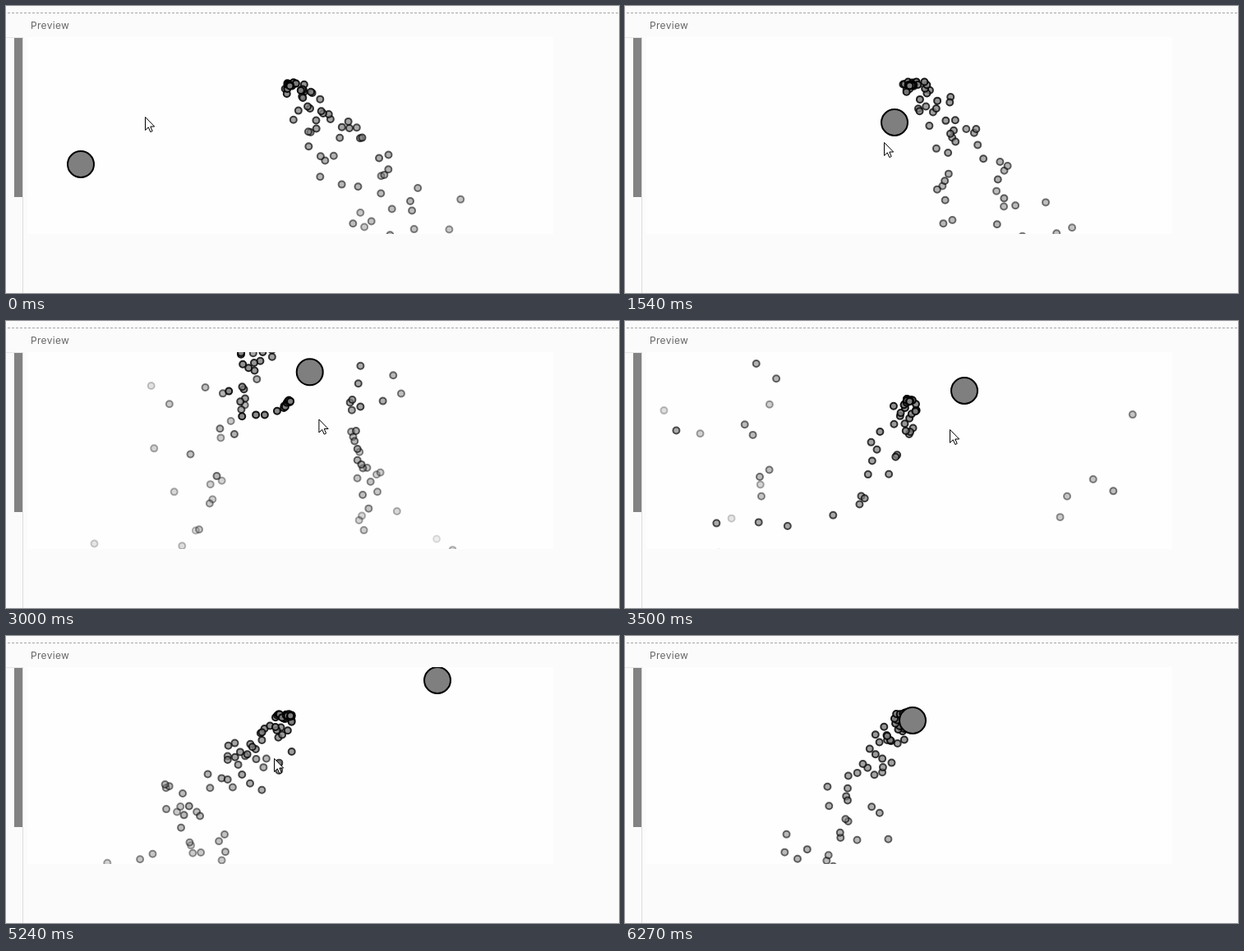
Recreate the animation shown at these times as an HTML page with a canvas. Size 746 by 350 pixels, loop 6300 ms.

```html
<!DOCTYPE html>
<html lang="en">
<head>
<meta charset="utf-8">
<title>Preview</title>
<style>
  html, body { margin: 0; width: 100%; height: 100%; overflow: hidden; background: #fbfbfb; }
  canvas { position: absolute; left: 0; top: 0; }
  h1 {
    position: absolute; left: 30px; top: 16px; margin: 0;
    font: 400 12px/16px Inter, sans-serif; letter-spacing: .3px; color: #666;
  }
</style>
</head>
<body>
<canvas id="stage" width="746" height="350"></canvas>
<h1>Preview</h1>
<script>
const ctx = document.getElementById('stage').getContext('2d');
const LOOP = 6300, FRAMES = 189, WARMUP = 140;
const VIEW = [26, 38, 640, 240];
const SOURCE = { x: 346, y: 98 };
const GRAVITY = 0.1, POWER = 150;

// Key points: time in ms, x, y
const BALL = [
  [0, 91, 193], [400, 84, 152], [1000, 205, 101], [1540, 328, 142], [1980, 366, 196],
  [2440, 343, 170], [2800, 353, 98], [3150, 384, 48], [3500, 413, 85], [4240, 410, 194],
  [4800, 440, 118], [5240, 525, 54], [5750, 503, 51], [6270, 350, 103]
];
const POINTER = [
  [0, 169, 135], [1540, 315, 166], [2440, 363, 112], [3500, 395, 132],
  [4240, 428, 127], [5240, 326, 149], [5750, 332, -25]
];

// Smooth curve through timed points
function along(track, t) {
  const last = track.length - 1;
  if (t <= track[0][0]) return track[0].slice(1);
  if (t >= track[last][0]) return track[last].slice(1);
  const i = track.findIndex(p => p[0] > t) - 1;
  const a = track[i], b = track[i + 1], span = b[0] - a[0], u = (t - a[0]) / span;
  const slope = (k, c) => {
    const p = track[Math.max(k - 1, 0)], q = track[Math.min(k + 1, last)];
    return (q[c] - p[c]) / (q[0] - p[0]) * span;
  };
  return [1, 2].map(c => {
    const m = slope(i, c), n = slope(i + 1, c), d = b[c] - a[c];
    return a[c] + u * (m + u * (3 * d - 2 * m - n + u * (m + n - 2 * d)));
  });
}

function seeded(seed) {
  return () => {
    seed = (seed + 0x6d2b79f5) | 0;
    let v = Math.imul(seed ^ (seed >>> 15), 1 | seed);
    v = (v + Math.imul(v ^ (v >>> 7), 61 | v)) ^ v;
    return ((v ^ (v >>> 14)) >>> 0) / 4294967296;
  };
}

// Run the fountain once, two steps per shown picture
function simulate() {
  const rand = seeded(17), shots = [];
  let dots = [];
  for (let s = -WARMUP; s < FRAMES * 2; s++) {
    const [bx, by] = along(BALL, s * 1000 / 60);
    dots.push({ ...SOURCE, vx: rand() * 2 - 1, vy: -rand(), life: 255 });
    for (const p of dots) {
      const dx = p.x - bx, dy = p.y - by, dist = Math.hypot(dx, dy) || 1;
      const near = Math.min(Math.max(dist, 5), 50);
      const push = POWER / (near * near) / dist;
      p.vx += dx * push;
      p.vy += dy * push + GRAVITY;
      p.x += p.vx;
      p.y += p.vy;
      p.life -= 2;
    }
    dots = dots.filter(p => p.life > 0);
    if (s >= 0 && s % 2 === 0) shots.push(dots.map(p => [p.x, p.y, p.life / 255]));
  }
  return shots;
}

function disc(x, y, r, alpha) {
  ctx.fillStyle = `rgba(127,127,127,${alpha})`;
  ctx.strokeStyle = `rgba(0,0,0,${alpha})`;
  ctx.lineWidth = 2;
  ctx.beginPath();
  ctx.arc(x, y, r, 0, Math.PI * 2);
  ctx.fill();
  ctx.stroke();
}

function line(x1, y1, x2, y2, color, dash = []) {
  ctx.strokeStyle = color;
  ctx.lineWidth = 1;
  ctx.setLineDash(dash);
  ctx.beginPath();
  ctx.moveTo(x1, y1);
  ctx.lineTo(x2, y2);
  ctx.stroke();
  ctx.setLineDash([]);
}

function drawPage() {
  ctx.fillStyle = '#fbfbfb';
  ctx.fillRect(0, 0, 746, 350);
  line(2, 8.5, 746, 8.5, '#a6a6a6', [3, 2]);
  line(0, 38.5, 20, 38.5, '#e6e6e6');
  line(20.5, 38, 20.5, 350, '#dcdcdc');
  ctx.fillStyle = '#828282';
  ctx.fillRect(10, 39, 10, 194);
  ctx.fillStyle = '#fefefe';
  ctx.fillRect(...VIEW);
}

const arrow = new Path2D('M.5 .5V16.5L4.3 12.9L6.8 18.6L9.2 17.5L6.8 12H11.7Z');

function drawPointer(x, y) {
  ctx.save();
  ctx.translate(x, y);
  ctx.fillStyle = '#fff';
  ctx.strokeStyle = '#000';
  ctx.lineWidth = 1;
  ctx.fill(arrow);
  ctx.stroke(arrow);
  ctx.restore();
}

const shots = simulate();

function draw(frame) {
  const t = Math.ceil(frame * 10 / 3) * 10;
  drawPage();
  ctx.save();
  ctx.beginPath();
  ctx.rect(...VIEW);
  ctx.clip();
  for (const [x, y, alpha] of shots[frame]) disc(x, y, 4, alpha);
  disc(...along(BALL, t), 16, 1);
  ctx.restore();
  drawPointer(...along(POINTER, t));
}

const start = performance.now();
function tick() {
  const t = (performance.now() - start) % LOOP;
  draw(Math.min(Math.floor(t * 3 / 100), FRAMES - 1));
  requestAnimationFrame(tick);
}
tick();
</script>
</body>
</html>
```
